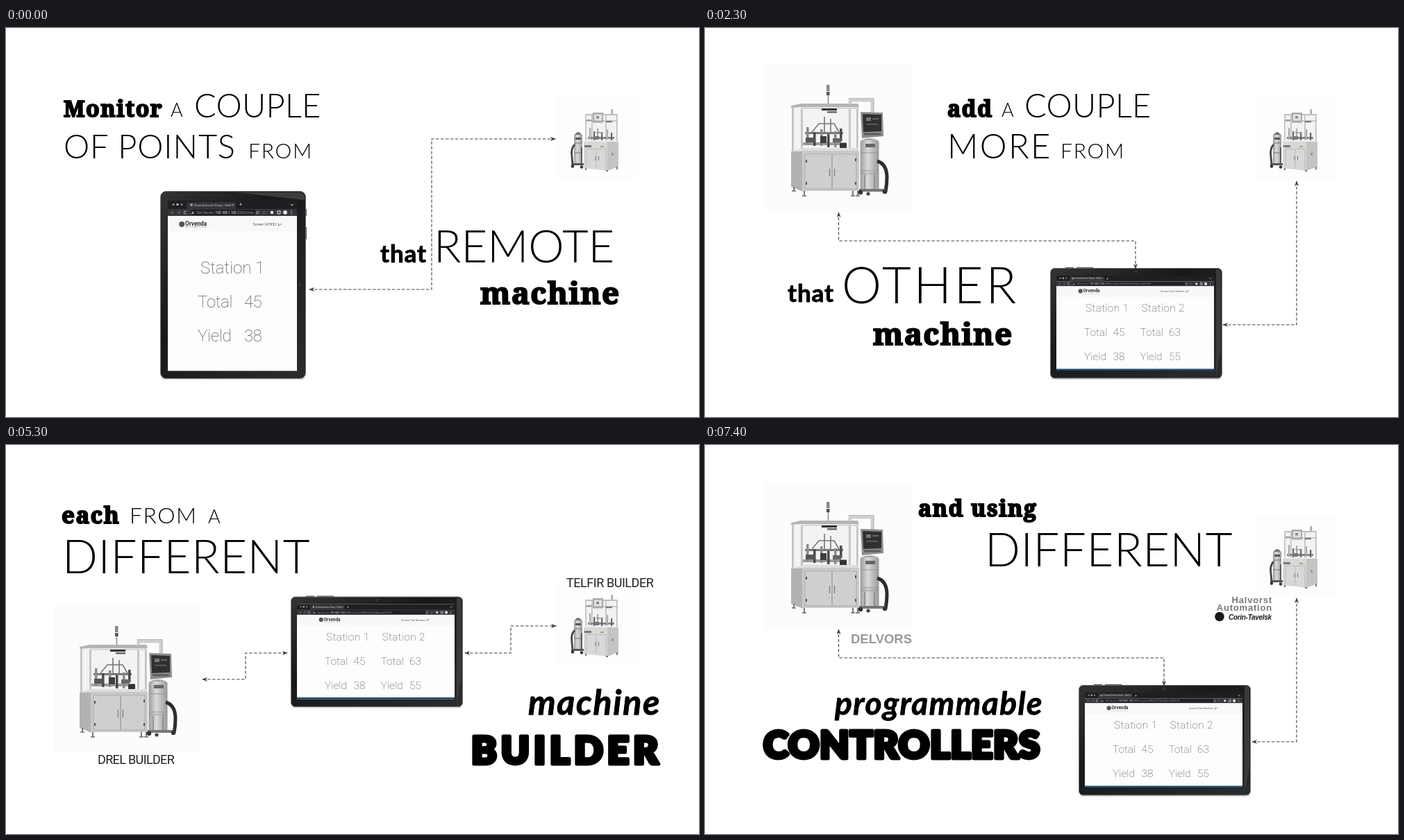
Recreate the animation shown at these times as an HTML page. Size 998 by 561 pixels, loop 8000 ms.

```html
<!DOCTYPE html>
<html lang="en">
<head>
<meta charset="utf-8">
<title>Remote machine monitoring</title>
<style>
  html, body { margin: 0; width: 100%; height: 100%; overflow: hidden; background: #fff; }
  svg { display: block; width: 100%; height: 100%; }
  text { white-space: pre; }
  .thin { font-family: Lato, sans-serif; font-weight: 300; }
  .slab { font-family: "Noto Serif", serif; font-weight: 900; stroke: #000; stroke-width: 2; }
  .hand { font-family: Lato, sans-serif; font-weight: 700; stroke: #000; stroke-width: .9; stroke-linejoin: round; }
  .slant { font-style: italic; }
  .deco { font-family: Lato, sans-serif; font-weight: 900; stroke: #000; stroke-width: 5; stroke-linejoin: round; }
  .label { font-family: Roboto, sans-serif; font-weight: 400; fill: #222; }
  .brand { font-family: "Liberation Sans", Arial, sans-serif; font-weight: 700; }
  .data { font-family: Roboto, sans-serif; font-weight: 100; fill: #444; }
  .ui { font-family: Roboto, sans-serif; }
  .link { fill: none; stroke: #444; stroke-width: 1.1; stroke-dasharray: 4.5 2.5;
          marker-start: url(#tip); marker-end: url(#tip); }
</style>
</head>
<body>
<svg id="stage" viewBox="0 0 998 561" xmlns="http://www.w3.org/2000/svg"></svg>
<script>
const LOOP = 8000;

const text = (cls, x, y, size, str, gap = 0, extra = '') =>
  `<text class="${cls}" x="${x}" y="${y}" font-size="${size}" letter-spacing="${gap}" ${extra}>${str}</text>`;
const rect = (x, y, w, h, fill, extra = '') =>
  `<rect x="${x}" y="${y}" width="${w}" height="${h}" fill="${fill}" ${extra}/>`;
const dot = (x, y, r, fill) => `<circle cx="${x}" cy="${y}" r="${r}" fill="${fill}"/>`;
const line = (d, color, w = 1, extra = '') =>
  `<path d="${d}" fill="none" stroke="${color}" stroke-width="${w}" ${extra}/>`;
const shape = (d, fill) => `<path d="${d}" fill="${fill}"/>`;
const link = d => `<path class="link" d="${d}"/>`;
const use = (id, dx = 0, dy = 0) => `<use href="#${id}" x="${dx}" y="${dy}"/>`;

// Browser window: tab strip, toolbar, page header. k scales the controls.
function browser(x, y, w, h, k, url) {
  const right = n => x + w - n * k;
  const tabY = y + 7 * k, barY = y + 17 * k;
  const icon = '#c4c6ca';
  return rect(x, y, w, h, '#fdfdfd') +
    rect(x, y, w, 12 * k, '#1e1f22') +
    rect(x + 27 * k, y + 2 * k, 71 * k, 10 * k, '#35363a', `rx="${2 * k}"`) +
    rect(x, y + 12 * k, w, 10 * k, '#35363a') +
    rect(x + 33 * k, y + 13 * k, w - 92 * k, 8 * k, '#202124', `rx="${4 * k}"`) +
    rect(x, y + 22 * k, w, 22 * k, '#f7f8f9') +
    ['#8a8a8a', '#d5d5d5', '#8a8a8a'].map((c, i) => dot(x + (8 + 6 * i) * k, y + 5.5 * k, 1.6 * k, c)).join('') +
    dot(x + 34 * k, y + 6 * k, 2 * k, '#999') +
    text('ui', x + 38 * k, tabY + .6 * k, 4 * k, 'Orvenda Screen Viewer - Solid', 0, 'fill="#ddd"') +
    text('ui', x + 92 * k, tabY + .8 * k, 6 * k, '×', 0, 'fill="#ddd"') +
    text('ui', x + 103 * k, tabY + 1 * k, 7 * k, '+', 0, 'fill="#eee"') +
    line(`M${right(9)} ${y + 5 * k}l${2 * k} ${2 * k}l${2 * k} ${-2 * k}`, '#ddd', k) +
    line(`M${x + 9 * k} ${barY}h${-4 * k}m${2 * k} ${-2 * k}l${-2 * k} ${2 * k}l${2 * k} ${2 * k}`, '#77797d', .8 * k) +
    line(`M${x + 14 * k} ${barY}h${4 * k}m${-2 * k} ${-2 * k}l${2 * k} ${2 * k}l${-2 * k} ${2 * k}`, '#77797d', .8 * k) +
    line(`M${x + 27 * k} ${barY - k}a${2 * k} ${2 * k} 0 1 0 0 ${2 * k}`, icon, .9 * k) +
    shape(`M${x + 36 * k} ${barY - 2 * k}l${2.4 * k} ${4 * k}h${-4.8 * k}z`, '#9a9ca0') +
    text('ui', x + 42 * k, barY + 1.7 * k, 4.7 * k,
      `Not Secure | <tspan fill="#fff">192.168.1.152</tspan>${url}`, 0, 'fill="#8f9195"') +
    `<circle cx="${right(57)}" cy="${barY}" r="${1.8 * k}" fill="none" stroke="${icon}" stroke-width="${.7 * k}"/>` +
    text('ui', right(50), barY + 2 * k, 6 * k, '☆', 0, `fill="${icon}"`) +
    rect(right(38), barY - 2 * k, 4 * k, 4 * k, '#e8e8e8', `rx="${k}"`) +
    line(`M${right(28)} ${barY - 2 * k}h${4 * k}v${4 * k}h${-4 * k}z`, '#e8e8e8', k) +
    dot(right(17), barY, 3 * k, '#dcdcdc') +
    [-2, 0, 2].map(d => dot(right(8), barY + d * k, .7 * k, icon)).join('');
}

function pageHead(x, y, size, endX, title) {
  return dot(x + size * .5, y - size * .25, size * .48, '#555') +
    text('ui', x + size * 1.08, y, size, 'Orvenda', 0, 'font-weight="700" fill="#333"') +
    text('ui', x + size * 1.1, y + size * .42, size * .34, 'AUTOMATION', size * .16, 'fill="#666"') +
    text('ui', endX, y, size * .6, title, 0, 'fill="#555" text-anchor="end"') +
    line(`M${endX + size * .4} ${y - size * .45}v${size * .42}h${size * .25}m0 ${-size * .21}h${size * .3}`, '#555', size * .1);
}

function portrait() {
  const rows = [[281, 354, 'Station 1', 0], [277, 403, 'Total', -.3], [344, 403, '45', -.6],
                [277, 452, 'Yield', -.2], [344, 452, '38', -.6]];
  return rect(224, 503, 206, 4, '#d9d9d9', 'rx="2"') +
    rect(430.5, 261, 2.5, 10, '#555') + rect(430.5, 287, 2.5, 18, '#555') +
    rect(222.5, 235.5, 209, 270, 'url(#glass)', 'rx="8" stroke="#777"') +
    shape('M330 237h92q8 0 8 8v3z', '#3d3d3d') +
    browser(233, 249, 186, 245.5, 1, ':3000/scree…') +
    pageHead(249, 285, 8.3, 389, 'Screen 247853') +
    rows.map(([x, y, s, g]) => text('data', x - 1, y, 24, s, g)).join('') +
    dot(423.5, 370, 2, '#444') + dot(423.5, 370, .8, '#111');
}

function landscape() {
  const columns = [[546, 'Station 1', 45, 38], [626.5, 'Station 2', 63, 55]];
  return rect(499, 503.5, 244, 3.5, '#d9d9d9', 'rx="2"') +
    rect(519, 345, 12, 2, '#555') + rect(535, 345, 24, 2, '#555') +
    rect(497.5, 346.5, 247, 158.5, 'url(#glass)', 'rx="6" stroke="#777"') +
    shape('M736 348h3q4 0 4 5v110l-7 40z', '#3a3a3a') +
    browser(506, 357, 227, 137, .7, ':3000/screen/c1f0b47d-27ba-4d6a-aed9-4c01') +
    rect(506, 491.5, 227, 2.5, '#1d4a75') +
    pageHead(537.5, 381, 6.4, 691, 'Screen Two Stations') +
    columns.map(([x, name, total, rate]) =>
      text('data', x + 2, 409, 15.5, name, .3) +
      text('data', x, 444, 15.5, 'Total') + text('data', x + 41.5, 444, 15.5, total) +
      text('data', x, 479, 15.5, 'Yield') + text('data', x + 41.5, 479, 15.5, rate)).join('') +
    dot(620.5, 351.5, 1.8, '#4a4a4a') + dot(620.5, 351.5, .7, '#111');
}

function bigMachine() {
  const posts = [[125, 112, 66], [138, 117, 58], [207, 117, 58], [218, 113, 65]];
  const arms = [148, 158, 168, 178, 188, 196];
  return rect(87, 53, 212, 212, '#fcfcfc') +
    // signal tower
    rect(175, 82, 4.5, 9, '#888') + rect(175, 92, 4.5, 5, '#555') + rect(176.5, 97, 1.8, 15, '#999') +
    // glass cage
    shape('M126 112h93v64h-93z', '#f3f3f3') +
    posts.map(([x, y, h]) => rect(x, y, 2.8, h, '#c3c3c3')).join('') +
    shape('M124 112l14-3h82l2 5h-83l-15 1z', '#b5b5b5') +
    rect(138, 114.5, 82, 2.5, '#d8d8d8') +
    rect(168, 116, 22, 3, '#333') + rect(176, 120, 14, 2.5, '#666') +
    // handling gear
    rect(144, 150, 55, 3, '#777') + rect(141, 165, 62, 4, '#999') +
    arms.map((x, i) => rect(x - 2, 143 + (i * 7) % 11, 3.5, 25 - (i * 5) % 9, i % 2 ? '#4a4a4a' : '#8a8a8a')).join('') +
    line('M154 150l10-12h22l8 14M172 128v22M181 131v20', '#777', 1.6) +
    rect(145, 158, 13, 7, '#555') + rect(166, 156, 9, 10, '#3e3e3e') + rect(184, 159, 12, 6, '#666') +
    rect(194, 166, 10, 8, '#333') +
    // cabinet
    shape('M123 178l18-5h80v5z', '#dedede') +
    shape('M124 178h17v58l-17-7z', '#b2b2b2') +
    rect(140, 177, 82, 58, '#c9c9c9') +
    rect(144, 182, 38.5, 50, '#cfcfcf', 'stroke="#a5a5a5" stroke-width=".8"') +
    rect(183.5, 182, 34.5, 50, '#cfcfcf', 'stroke="#a5a5a5" stroke-width=".8"') +
    line('M179.5 203v11M186.5 203v11', '#777', 1.2) +
    [[146, 192], [146, 224], [217, 190], [217, 224]].map(([x, y]) => rect(x - 1, y - 2, 2, 4, '#555')).join('') +
    [127, 142, 212, 219].map((x, i) => rect(x, i ? 235 : 229, 2, 6, '#777') + rect(x - 2, i ? 241 : 234, 6, 2, '#888')).join('') +
    // monitor on its arm
    line('M209 110v-6h32v18', '#cfcfcf', 5) + line('M207 101.5h36v20', '#aaa', .8) +
    shape('M224 121l32 1 1 34-31 3z', '#8d8d8d') +
    shape('M227 124l27 1v24l-26 1z', '#303030') +
    rect(232, 129, 7, 5, '#777') + rect(241, 130, 9, 2, '#666') + rect(232, 138, 17, 1.5, '#666') +
    rect(229, 151.5, 24, 3, '#5c5c5c') +
    // suction unit
    rect(223.5, 162, 27, 72, 'url(#steel)', 'rx="3"') +
    shape('M225 162q12-6 24 0z', '#aaa') +
    rect(231, 167, 14, 5, '#666') + line('M224 180h26M224 206h26M224 210h26', '#909090', .9) +
    line('M248 192q14 4 14 24q0 9-2 20', '#2d2d2d', 5) +
    line('M230 212v22M244 212v22', '#777', 1.2) +
    rect(222, 232, 38, 4, '#777') + dot(224, 237, 3.2, '#333') + dot(235, 239, 2.6, '#444') + dot(259, 236, 3.2, '#333');
}

function smallMachine() {
  return rect(792, 101, 118, 117, '#fdfdfd') +
    rect(871.5, 117, 2.6, 8, '#aaa') +
    shape('M834 125h47v41h-47z', '#f2f2f2') +
    rect(834, 124, 47, 1.8, '#b9b9b9') + rect(834, 133, 47, 1.8, '#c6c6c6') +
    [834, 843, 863, 879].map(x => rect(x, 124, 1.7, 42, '#c0c0c0')).join('') +
    rect(845, 122, 15, 14.5, '#a9a9a9') + rect(847, 124.5, 11, 9, '#e3e3e3') + rect(850, 127, 4, 3.5, '#888') +
    rect(864, 134, 9, 2.2, '#777') + rect(836, 132, 7, 2, '#999') +
    // handling gear
    rect(838, 157, 38, 3, '#888') +
    [840, 846, 851, 857, 865, 871].map((x, i) => rect(x, 144 + (i * 5) % 9, 2.2, 17 - (i * 4) % 7, i % 2 ? '#666' : '#aaa')).join('') +
    rect(850, 150, 10, 1.6, '#999') + rect(846, 156, 8, 5, '#777') +
    // cabinet
    shape('M832 164l3-2h42l5 2z', '#ececec') +
    shape('M832 164h35v42l-35-4z', '#d8d8d8') + shape('M866 164h16v36l-16 6z', '#c4c4c4') +
    line('M836 174l14 .5v28M852 174.5h12v30M836 174v26', '#b3b3b3', .8) +
    rect(833, 169, 10, 3, '#777') + rect(856, 170, 5, 2, '#c79a5a') +
    line('M849 185v6M853.5 185v6', '#777') + rect(872, 180, 3, 4, '#999') +
    rect(834, 202, 2, 3, '#777') + rect(864, 205, 3, 2, '#777') + rect(879, 200, 2, 4, '#777') +
    // suction unit
    rect(818, 153, 12, 44, 'url(#steel)', 'rx="2"') +
    shape('M819 154q5-8 10 0z', '#777') +
    rect(820, 158, 8, 3, '#555') + line('M818 166h12M818 180h12', '#777') +
    line('M819 168q-6 6-4 18l1 10', '#444', 2.8) +
    line('M829 172v24', '#444', 1.5) +
    rect(814, 195, 18, 3, '#555') + dot(816, 199.5, 2.2, '#333') + dot(829, 200.5, 2.2, '#333');
}

const scenes = [
  { from: 0, body:
    text('slab', 83, 128, 32, 'Monitor', 1.6) + text('thin', 237, 128, 27, 'A') +
    text('thin', 271, 129, 47, 'COUPLE', .3) + text('thin', 83, 188, 47, 'OF POINTS', .9) +
    text('thin', 349, 188, 30, 'FROM', 1.7) +
    text('hand', 539, 338, 35, 'that', .9) + text('thin', 616, 338, 65, 'REMOTE') +
    text('slab', 683, 398, 44, 'machine', 1.3) +
    use('portrait') + use('small') + link('M437 377H613V160H791') },
  { from: 500, body:
    use('big') + use('small') + use('landscape') +
    text('slab', 349, 128, 32, 'add', 1.6) + text('thin', 427, 128, 27, 'A') +
    text('thin', 460, 129, 47, 'COUPLE', .3) + text('thin', 349, 188, 49, 'MORE', 2.3) +
    text('thin', 512, 188, 30, 'FROM', 1.7) +
    text('hand', 119, 395, 35, 'that', .9) + text('thin', 197, 397, 72, 'OTHER', 3.9) +
    text('slab', 242, 457, 44, 'machine', 1.3) +
    link('M192.5 266V307H620V347') + link('M746 428H852V221') },
  { from: 3500, body:
    use('big', -18, 179) + use('small', 0, 99) + use('landscape', -87, -127.5) +
    text('slab', 80, 113, 33, 'each', 1.6) + text('thin', 178, 113, 32, 'FROM', 1.4) + text('thin', 291, 113, 27, 'A') +
    text('thin', 81, 185, 67, 'DIFFERENT', .6) +
    text('label', 132, 460, 18, 'DREL BUILDER', -.65) + text('label', 807, 205, 18, 'TELFIR BUILDER', -.45) +
    text('hand slant', 752, 389, 50, 'machine', 1.7) + text('deco', 670, 460, 55, 'BUILDER', 6) +
    link('M283 338H345V300H405') + link('M661 300H727V261H792') },
  { from: 6500, body:
    use('big') + use('small') + use('landscape', 41) +
    text('slab', 307, 103, 32, 'and using', 1.6) + text('thin', 403, 175, 67, 'DIFFERENT', .6) +
    text('brand', 210, 286, 18.5, 'DELVORS', 0, 'fill="#999"') +
    text('brand', 817, 228, 13, 'Halvorst', .8, 'fill="#777" text-anchor="end"') +
    text('brand', 817, 239, 13, 'Automation', .8, 'fill="#777" text-anchor="end"') +
    dot(741, 247.5, 6.8, '#1a1a1a') +
    text('brand slant', 754, 251.5, 10, 'Corin-Tavelsk', -.3, 'fill="#1a1a1a"') +
    text('hand slant', 187, 389, 46, 'programmable', 1.5) + text('deco', 84, 452, 55, 'CONTROLLERS', .6) +
    link('M192.5 266V307H661V347') + link('M788 428H852V221') }
];

const stage = document.getElementById('stage');
stage.innerHTML = `<defs>
  <marker id="tip" viewBox="0 0 8 6" refX="7" refY="3" markerWidth="8" markerHeight="6"
    markerUnits="userSpaceOnUse" orient="auto-start-reverse"><path d="M0 0L8 3L0 6L2 3z" fill="#444"/></marker>
  <linearGradient id="glass" x2="1" y2="1"><stop stop-color="#333"/><stop offset=".4" stop-color="#191919"/>
    <stop offset="1" stop-color="#2c2c2c"/></linearGradient>
  <linearGradient id="steel"><stop stop-color="#9c9c9c"/><stop offset=".4" stop-color="#dadada"/>
    <stop offset="1" stop-color="#999"/></linearGradient>
  <g id="portrait">${portrait()}</g><g id="landscape">${landscape()}</g>
  <g id="big">${bigMachine()}</g><g id="small">${smallMachine()}</g>
</defs>` + scenes.map(s => `<g class="scene">${s.body}</g>`).join('');

// Hard cuts: each scene is shown from its own time until the next one begins.
const groups = [...stage.querySelectorAll('.scene')];
groups.forEach((group, i) => {
  const frames = scenes.map((s, j) => ({ offset: s.from / LOOP, opacity: +(i === j), easing: 'step-end' }));
  frames.push({ offset: 1, opacity: +(i === groups.length - 1) });
  group.animate(frames, { duration: LOOP, iterations: Infinity, fill: 'both' });
});
</script>
</body>
</html>
```
